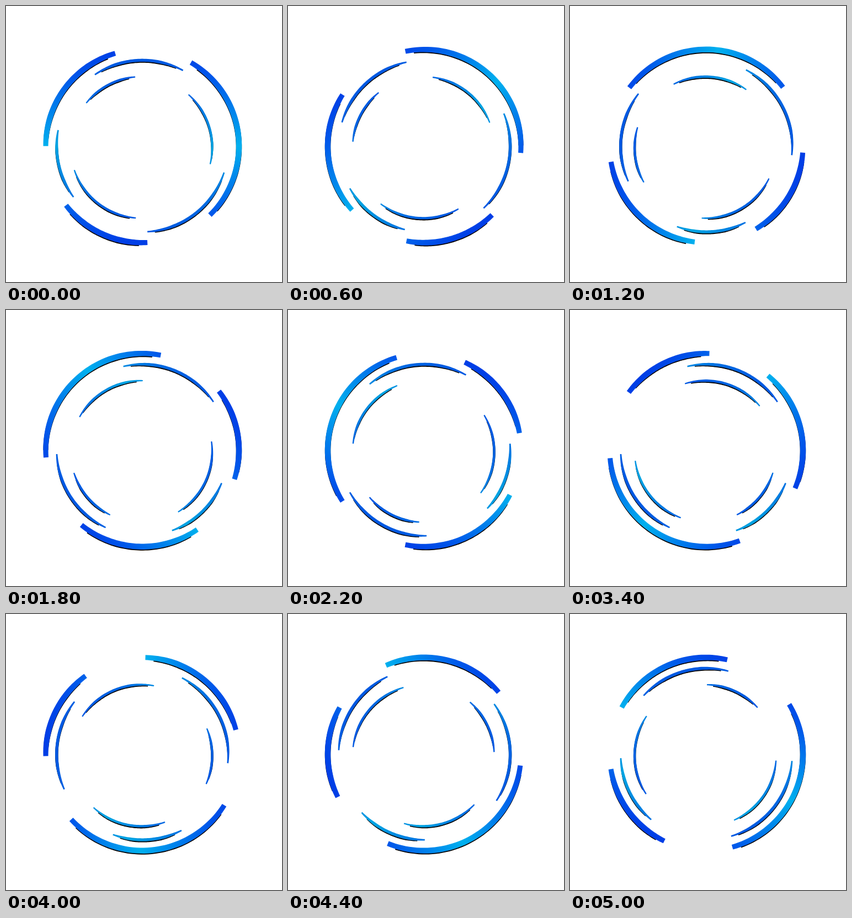
An HTML page with a canvas for the animation above (5200 ms loop, 500 by 500 pixels).

```html
<!DOCTYPE html>
<html lang="en">
<head>
<meta charset="utf-8">
<title>Rotating rings</title>
<style>
  html, body { margin: 0; width: 100%; height: 100%; overflow: hidden; background: #fff; }
  canvas { display: block; width: 100%; height: 100%; object-fit: contain; }
</style>
</head>
<body>
<canvas id="stage" width="500" height="500"></canvas>
<script>
const ctx = document.getElementById("stage").getContext("2d");
const LOOP = 5200, HALF = 2600, STEP = 200;
const RAD = Math.PI / 180;
const BOLD = ["#003ee6", "#0058ea", "#00b0ee"];
const THIN = ["#0058e2", "#0068e2", "#00a4e2"];

// Arcs are [start, end] in degrees, clockwise from the right.
// turn: degrees after the first half; rate: degrees per ms in the second half.
const rings = [
  { x: 247, y: 253.7, r: 175, mid: 10.4, tip: 9, turn: -180, rate: -12.6 / STEP, colors: BOLD,
    arcs: [[180, 253.7], [300.2, 405.6], [87, 142.2]] },
  { x: 247.2, y: 253.7, r: 155.4, mid: 5.4, tip: 2.6, turn: -174.6, rate: 174.6 / HALF, colors: THIN,
    arcs: [[236.3, 298.2], [18, 86.7], [143.5, 190.7]] },
  { x: 245.3, y: 256.2, r: 128.2, mid: 4.4, tip: 2.2, turn: -148.2, rate: -13.28 / STEP, colors: THIN,
    arcs: [[218.8, 265], [311.7, 373.7], [94.5, 161.4]] }
];

function angleAt(ring, t) {
  return t < HALF ? ring.turn * t / HALF : ring.turn + ring.rate * (t - HALF);
}

// Fills a band along the circle that narrows toward both ends.
function band(ring, from, to) {
  const n = 48;
  ctx.beginPath();
  for (const side of [1, -1]) {
    for (let i = 0; i <= n; i++) {
      const p = side > 0 ? i / n : 1 - i / n;
      const swell = Math.min(1, Math.sin(Math.PI * p) * 1.4);
      const width = ring.tip + (ring.mid - ring.tip) * swell;
      const a = (from + (to - from) * p) * RAD;
      const r = ring.r + side * width / 2;
      ctx.lineTo(r * Math.cos(a), r * Math.sin(a));
    }
  }
  ctx.closePath();
  ctx.fill();
}

function paintFor({ r, colors: [edge, near, middle] }) {
  const g = ctx.createLinearGradient(0, -r, 0, r);
  g.addColorStop(0, edge);
  g.addColorStop(0.15, near);
  g.addColorStop(0.5, middle);
  g.addColorStop(0.85, near);
  g.addColorStop(1, edge);
  return g;
}

function drawRing(ring, t) {
  const turn = angleAt(ring, t);
  const layer = (dy, inset, fill) => {
    ctx.save();
    ctx.translate(ring.x, ring.y + dy);
    ctx.rotate(turn * RAD);
    ctx.fillStyle = fill;
    for (const [a, b] of ring.arcs) band(ring, a + inset, b - inset);
    ctx.restore();
  };
  layer(1.8, 5, "#000");
  layer(0, 0, paintFor(ring));
}

function frame() {
  const t = Math.floor(performance.now() % LOOP / STEP) * STEP;
  ctx.clearRect(0, 0, 500, 500);
  for (const ring of rings) drawRing(ring, t);
  requestAnimationFrame(frame);
}
frame();
</script>
</body>
</html>
```
